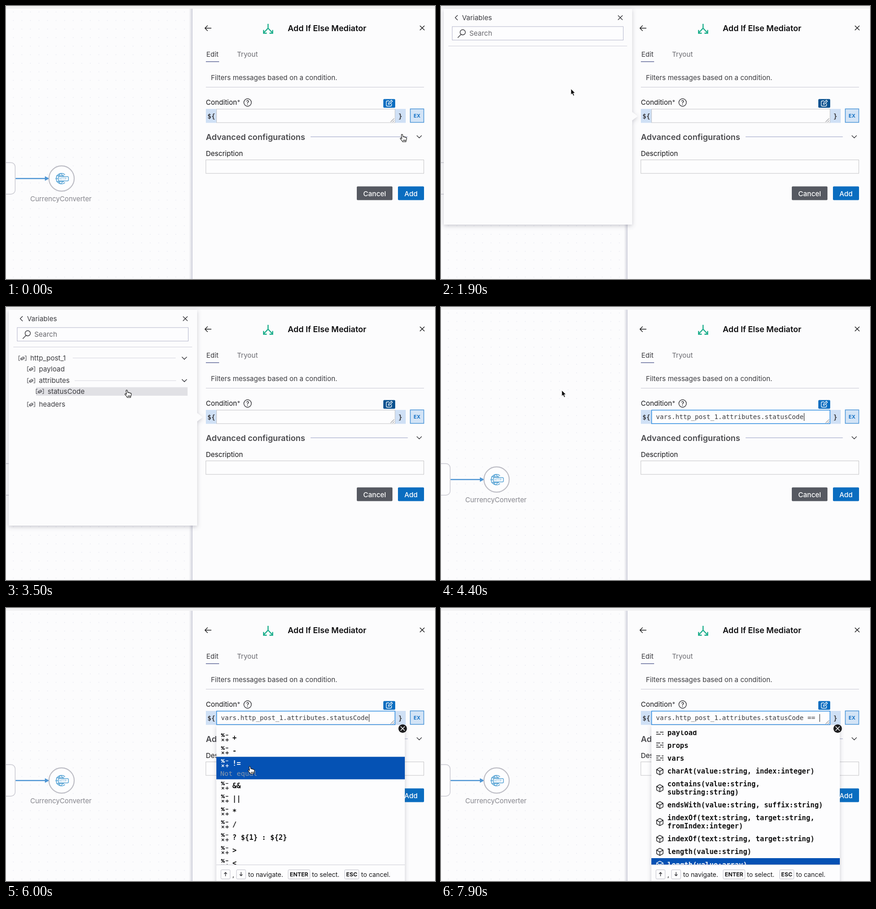
An HTML page for the animation above (8 s loop, 938 px wide and 597 px high).

```html
<!DOCTYPE html>
<html lang="en">
<head>
<meta charset="utf-8">
<title>Add If Else Mediator</title>
<style>
html, body { margin: 0; width: 100%; height: 100%; overflow: hidden; background: #fcfcfd; }
svg { display: block; width: 938px; height: 597px; }
text { font: 15px Inter, "Open Sans", sans-serif; fill: #3c3c40; white-space: pre; }
.dark { fill: #141416; }
.title { font-size: 17.7px; font-weight: 600; fill: #0c0c0e; }
.head { font-size: 17.8px; font-weight: 600; fill: #4a4a4e; }
.btn { font-weight: 500; fill: #fff; }
.mono { font: 14.12px "DejaVu Sans Mono", monospace; }
.item { font: bold 15.28px "DejaVu Sans Mono", monospace; fill: #111; }
.desc { font: 14.95px "DejaVu Sans Mono", monospace; fill: #8b98a8; }
.foot { font-size: 13.9px; fill: #18181a; }
.key { font-size: 12.2px; font-weight: 700; fill: #18181a; }
.line { fill: none; stroke: #333338; stroke-width: 1.4; stroke-linecap: round; stroke-linejoin: round; }
.field { fill: #fdfdfe; stroke: #c4c4c6; }
.affix { fill: #cfe0f5; }
.ico { color: #18181a; }
.on .ico { color: #fff; }
.on .item { fill: #fff; }
.row .hl { fill: #0552b4; visibility: hidden; }
.row .desc { visibility: hidden; }
.on .hl, .on .desc { visibility: inherit; }
</style>
</head>
<body>
<svg viewBox="0 0 938 597" xmlns="http://www.w3.org/2000/svg">
<defs>
  <pattern id="dots" width="18.7" height="18.7" patternUnits="userSpaceOnUse">
    <circle cx="16" cy="13" r=".8" fill="#dadcea"/>
  </pattern>
  <linearGradient id="edge">
    <stop offset="0" stop-color="#c9cad6" stop-opacity="0"/>
    <stop offset="1" stop-color="#c9cad6" stop-opacity=".85"/>
  </linearGradient>
  <filter id="shadow" x="-10%" y="-10%" width="120%" height="120%">
    <feDropShadow dx="0" dy="3" stdDeviation="5" flood-color="#55576a" flood-opacity=".3"/>
  </filter>
  <clipPath id="listClip"><rect x="460" y="268" width="412" height="293"/></clipPath>
  <g id="ops" fill="none" stroke="currentColor" stroke-width="1.4">
    <circle cx="2" cy="-6" r="1.3"/><circle cx="6.4" cy="-1.8" r="1.3"/>
    <path d="M7-8 1.4 0M10.5-4h5.5M1.6 4l5 5m0-5-5 5M10 6.5h7M13.5 3v7"/>
  </g>
  <g id="rows" fill="none" stroke="currentColor" stroke-width="1.5">
    <path d="M0-5h9M12-5h4M0-.5h5M8-.5h8M0 4h10M13 4h3"/>
  </g>
  <g id="cube" class="line" style="stroke:currentColor">
    <path d="M8-7.5 15-3.6V4.4L8 8.3 1 4.4V-3.6ZM1-3.6 8 .4l7-4M8 .4v7.9"/>
  </g>
  <g id="var" fill="none" stroke="#55555a" stroke-width="1.2">
    <path d="M3-5H0V5h3M13-5h3V5h-3M4 .6 9.5-3 12-1.2V1L6.5 4 4 2.4ZM4 .6l2.5 1.2L12-1.2"/>
  </g>
  <path id="chev" class="line" d="M-5-2.5 0 2.5 5-2.5"/>
  <path id="cross" d="M-4.6-4.6 4.6 4.6M4.6-4.6-4.6 4.6"/>
</defs>

<rect width="938" height="597" fill="#fcfcfd"/>
<rect y="6" width="408" height="591" fill="url(#dots)"/>

<!-- canvas nodes -->
<rect x="-60" y="342.5" width="80" height="69" rx="9" fill="#fdfdfe" stroke="#c6c6ce" stroke-width="1.4"/>
<path d="M21 377.3h66" stroke="#5096d4" stroke-width="2.4"/>
<path d="M85 372.3 95 377.3 85 382.3Z" fill="#5096d4"/>
<circle cx="121.5" cy="377.3" r="27.6" fill="#fdfdfe" stroke="#bdbdc5" stroke-width="2.2"/>
<g fill="none" stroke="#55a2d4" stroke-width="1.5">
  <path d="M129 369A11.5 11.5 0 1 0 129 386M119 366c-6 6-6 17 0 23M119 366c3 2 5 4 6 7M119 389c3-2 5-4 6-6M110 371h17M110 384h17M108 377.5h7"/>
  <rect x="114.500" y="373" width="22" height="9.500" rx="2" fill="#fdfdfe"/>
</g>
<text x="116.500" y="380" style="font-size:6px;fill:#55a2d4">HTTP</text>
<text x="53" y="427" style="font-size:14.8px;fill:#85858c">CurrencyConverter</text>

<!-- form panel -->
<rect x="400" y="6" width="8" height="591" fill="url(#edge)"/>
<rect x="408" y="6" width="530" height="591" fill="#fcfcfd"/>
<rect width="938" height="6" fill="#f1f1f2"/>
<path class="line" d="M448.500 48.500H435M440.500 43 435 48.500l5.500 5.500" style="stroke:#18181a"/>
<g fill="none" stroke="#1dae8c" stroke-width="2.400">
  <path d="M573 39v9.500L564 58M573 48.500 582 58M563.200 52.500v7h7M583 52.500v7h-7"/>
</g>
<text class="title" x="616" y="55">Add If Else Mediator</text>
<use href="#cross" x="910" y="48" class="line" style="stroke:#18181a"/>
<text x="438" y="110.500">Edit</text>
<text x="505" y="110.500" style="fill:#6c6c72">Tryout</text>
<path d="M437 121.700h29" stroke="#4b568c" stroke-width="1.300"/>
<text x="448" y="161.500">Filters messages based on a condition.</text>
<path d="M437 177.500h477" stroke="#c6c6d2"/>

<text class="dark" x="437" y="216">Condition</text>
<text x="505.500" y="215" style="font-size:13px">*</text>
<circle class="line" cx="528.300" cy="211" r="8.200"/>
<text x="528.300" y="215.500" text-anchor="middle" style="font-size:12.500px;font-weight:600">?</text>
<rect id="editBtn" x="825" y="203.500" width="26" height="19" rx="2"/>
<path d="M838 207.500h-4.500a2 2 0 0 0-2 2v7.500a2 2 0 0 0 2 2h7.500a2 2 0 0 0 2-2v-4M836 215l.6-3 6-6 2.300 2.300-6 6Z" fill="none" stroke="#fff" stroke-width="1.300"/>
<rect class="affix" x="437" y="225" width="24" height="30.500"/>
<rect class="affix" x="850" y="225" width="24" height="30.500"/>
<text class="mono" x="440.500" y="245.500" style="font-weight:bold">${</text>
<text class="mono" x="858" y="245.500" style="font-weight:bold">}</text>
<rect id="input" class="field" x="460.500" y="225.500" width="390" height="29.500"/>
<path d="M841 253.500l7.500-7.500M845.500 253.500l3-3" stroke="#55555a"/>
<text id="expr" class="mono" x="470" y="245.300"></text>
<path id="caret" d="M828 232v17" stroke="#333" stroke-width="1.200"/>
<rect x="884" y="225" width="29.500" height="29.500" fill="#d3e4f6" stroke="#4a94d8" stroke-width="1.500"/>
<text x="898.700" y="244" text-anchor="middle" style="font-size:11px;font-weight:700;fill:#1673c6">EX</text>

<text class="head" x="437" y="292.500">Advanced configurations</text>
<path d="M666 286h212.500" stroke="#c7cbdf" stroke-width="2"/>
<use href="#chev" x="903.500" y="286"/>
<text class="dark" x="437" y="328">Description</text>
<rect class="field" x="437" y="336.500" width="476.500" height="29.500"/>
<rect x="767" y="394.500" width="78" height="30" rx="2" fill="#565961"/>
<text class="btn" x="806" y="415.800" text-anchor="middle">Cancel</text>
<rect x="857" y="394.500" width="57" height="30" rx="2" fill="#0a6dc0"/>
<text class="btn" x="885.500" y="415.800" text-anchor="middle">Add</text>

<!-- variable picker -->
<g id="picker">
  <path d="M6 6H418V232L430 241 418 250V478H6Z" fill="#fcfcfd" filter="url(#shadow)"/>
  <path class="line" d="M36 20.500 31 25.500l5 5"/>
  <text x="46" y="31">Variables</text>
  <use href="#cross" x="392" y="25.500" class="line"/>
  <rect class="field" x="24.500" y="45" width="374" height="29.500" style="stroke:#b4b6cc"/>
  <path class="line" d="M44 62 37 69"/><circle class="line" cx="47.500" cy="57.500" r="5.800"/>
  <text x="62" y="65.300" style="fill:#66666c">Search</text>
  <path d="M16 87.500h391" stroke="#cfcfda"/>
  <g id="skeleton" fill="#e3e7f0"></g>
  <g id="tree">
    <rect id="treeHover" x="66" y="175.500" width="331" height="18.500" fill="#e1e1e5"/>
    <path d="M146 111.500h225M150 161h222" stroke="#d4d4de"/>
    <use href="#chev" x="390" y="112"/><use href="#chev" x="390" y="161"/>
  </g>
</g>

<!-- completion list -->
<g id="menu">
  <rect x="460" y="256.500" width="412" height="350" fill="#fdfdfe" filter="url(#shadow)"/>
  <g clip-path="url(#listClip)">
    <g id="opList"></g>
    <g id="fnList"></g>
    <rect id="thumb" x="863" width="6.500" height="217" fill="#a6a6ab"/>
  </g>
  <path d="M460 561.700h412" stroke="#cbcbd3"/>
  <g fill="#fdfdfe" stroke="#bfbfc8">
    <rect x="470" y="572.500" width="20" height="20" rx="2"/><rect x="504" y="572.500" width="20" height="20" rx="2"/>
    <rect x="617" y="572.500" width="47.500" height="20" rx="2"/><rect x="740.500" y="572.500" width="31" height="20" rx="2"/>
  </g>
  <path class="line" d="M480 586v-7.500M477.300 581l2.700-2.700 2.700 2.700M514 578v7.500M511.300 583l2.700 2.700 2.700-2.700"/>
  <text class="foot" x="495" y="588">,</text>
  <text class="foot" x="529.500" y="588">to navigate.</text>
  <text class="key" x="640.700" y="587" text-anchor="middle">ENTER</text>
  <text class="foot" x="669" y="588">to select.</text>
  <text class="key" x="756" y="587" text-anchor="middle">ESC</text>
  <text class="foot" x="776.500" y="588">to cancel.</text>
  <circle cx="867.300" cy="263.700" r="9.300" fill="#1d1d1f"/>
  <use href="#cross" x="867.300" y="263.700" stroke="#fff" stroke-width="1.400"/>
</g>

<g id="cursor">
  <path id="arrow" d="M0 0V13.200L3 10.500 5.200 15.500 7.600 14.500 5.400 9.600H9.400Z" fill="#0a0a0a" stroke="#fff"/>
  <path id="hand" d="M-1.600 1.200C-1.600-.8 1.200-.8 1.400 1.200L2.200 5.200C3.200 4.200 4.800 4.600 5 5.800 6.200 5 7.400 5.600 7.600 6.600 8.800 6 10 6.800 10 8 10.200 11.500 8.600 13 8.400 16H1.200C.6 13.500-2.500 11.500-3.800 9.200-4.400 7.800-2.600 7-1.400 8.200L-.4 9ZM3 11.500v3M5 11.500v3M7 11.500v3" fill="#fff" stroke="#1a1a1a" stroke-width="1.200" stroke-linejoin="round"/>
</g>
</svg>

<script>
const LOOP = 8000, ROW = 28.2, DESC = 21, TOP = 269, MAX_SCROLL = 95;
const OPEN = 900, LOADING = 2000, LOADED = 2900, PICK = 3900, CLOSE = 4400, MENU = 4900,
      WHEEL = [6380, 6650], LEAVE = 6750, CHOOSE = 7500;
const EXPR = 'vars.http_post_1.attributes.statusCode';

const $ = id => document.getElementById(id);
const add = (parent, tag, attrs, text = '') => {
  const el = document.createElementNS('http://www.w3.org/2000/svg', tag);
  for (const k in attrs) el.setAttribute(k, attrs[k]);
  el.textContent = text;
  return parent.appendChild(el);
};
const show = (id, on) => { $(id).style.display = on ? '' : 'none'; };
const ease = p => p * p * (3 - 2 * p);
const ramp = (t, a, b) => ease(Math.min(1, Math.max(0, (t - a) / (b - a))));

for (let g = 0; g < 3; g++) {
  const y = 99 + g * 108.8;
  add($('skeleton'), 'rect', { x: 24, y, width: 118, height: 19.5 });
  for (let r = 0; r < 3; r++)
    for (const x of [24, 212])
      add($('skeleton'), 'rect', { x, y: y + 26 + r * 21.3, width: 178, height: 19 });
}

for (const [x, y, name] of [[28, 112, 'http_post_1'], [47, 135.5, 'payload'],
    [47, 161, 'attributes'], [66, 184.5, 'statusCode'], [47, 213, 'headers']]) {
  add($('tree'), 'use', { href: '#var', x, y });
  add($('tree'), 'text', { x: x + 25, y: y + 5.3 }, name);
}

const ops = [['+', 'Addition'], ['-', 'Subtraction'], ['!=', 'Not equal'], ['&&', 'And'], ['||', 'Or'],
  ['*', 'Multiplication'], ['/', 'Division'], ['? ${1} : ${2}', 'Conditional'], ['>', 'Greater than'],
  ['<', 'Less than'], ['>=', 'Greater than or equal'], ['<=', 'Less than or equal'], ['==', 'Equal']
].map(([sign, desc]) => {
  const g = add($('opList'), 'g', { class: 'row' });
  add(g, 'rect', { class: 'hl', x: 460, y: 0, width: 412, height: ROW + DESC });
  add(g, 'use', { href: '#ops', x: 470, y: 13, class: 'ico' });
  add(g, 'text', { class: 'item', x: 495, y: 19.5 }, sign);
  add(g, 'text', { class: 'desc', x: 468.500, y: 41.5 }, desc);
  return g;
});

let fnY = 258;
for (const [icon, ...lines] of [['rows', 'payload'], ['rows', 'props'], ['rows', 'vars'],
    ['cube', 'charAt(value:string, index:integer)'],
    ['cube', 'contains(value:string,', 'substring:string)'],
    ['cube', 'endsWith(value:string, suffix:string)'],
    ['cube', 'indexOf(text:string, target:string,', 'fromIndex:integer)'],
    ['cube', 'indexOf(text:string, target:string)'],
    ['cube', 'length(value:string)'], ['cube', 'length(value:array)']]) {
  const h = ROW + (lines.length - 1) * 17.6;
  const last = lines[0].includes('array');
  const g = add($('fnList'), 'g', { class: last ? 'row on' : 'row', transform: `translate(0 ${fnY})` });
  add(g, 'rect', { class: 'hl', x: 460, y: 0, width: 412, height: ROW });
  add(g, 'use', { href: '#' + icon, x: 470.500, y: h / 2, class: 'ico' });
  lines.forEach((s, i) => add(g, 'text', { class: 'item', x: 495, y: 19.5 + i * 17.6 }, s));
  fnY += h;
}

// start, end, x, y of the pointer tip
const moves = [[150, 750, 837, 211], [1050, 1700, 284, 181], [3000, 3400, 264, 182],
  [4500, 5200, 361, 209], [5650, 6300, 668.5, 455], [LEAVE, 7300, 640, 546]];

function pointer(t) {
  let x = 866, y = 281;
  for (const [a, b, tx, ty] of moves) {
    const p = ramp(t, a, b);
    x += (tx - x) * p;
    y += (ty - y) * p;
  }
  return [x, y];
}

function drawOps(t, x, y) {
  const scroll = MAX_SCROLL * ramp(t, ...WHEEL);
  const seen = t < LEAVE ? 0 : scroll;
  const tipY = t < LEAVE ? Math.min(y, 455) : y;
  const active = x > 460 && y > TOP
    ? Math.min(12, Math.max(0, Math.floor((tipY - TOP - DESC + seen) / ROW))) : -1;
  ops.forEach((g, i) => {
    const shift = active >= 0 && i > active ? DESC : 0;
    g.setAttribute('transform', `translate(0 ${TOP + i * ROW + shift - scroll})`);
    g.classList.toggle('on', i === active);
  });
  $('thumb').setAttribute('y', 270 + 72 * scroll / MAX_SCROLL);
}

function draw(t) {
  const [x, y] = pointer(t);
  const open = t >= OPEN && t < CLOSE, chosen = t >= CHOOSE;
  show('picker', open);
  show('skeleton', t >= LOADING && t < LOADED);
  show('tree', t >= LOADED);
  const onLeaf = open && t >= LOADED && y > 175 && y < 194;
  show('treeHover', onLeaf);
  $('editBtn').setAttribute('fill', open ? '#08518f' : '#0a6dc0');

  const focus = t >= CLOSE;
  $('input').style.stroke = focus ? '#2c8be0' : '';
  $('input').style.strokeWidth = focus ? 1.5 : 1;
  $('expr').textContent = t < PICK ? '' : EXPR + (chosen ? ' == ' : '');
  $('caret').setAttribute('transform', `translate(${chosen ? 0 : -34})`);
  show('caret', focus && Math.floor((t - (chosen ? CHOOSE : 3950)) / 500) % 2 === 0);

  show('menu', t >= MENU);
  show('opList', !chosen);
  show('fnList', chosen);
  show('thumb', t >= WHEEL[0] && !chosen);
  drawOps(t, x, y);

  const overMenu = t >= MENU && x > 460 && y > 268;
  const hand = t < 1100 || onLeaf || overMenu;
  show('hand', hand);
  show('arrow', !hand);
  show('cursor', t < CHOOSE + 100);
  $('cursor').setAttribute('transform', `translate(${x} ${y})`);
}

function tick() {
  draw(performance.now() % LOOP);
  requestAnimationFrame(tick);
}
tick();
</script>
</body>
</html>
```
